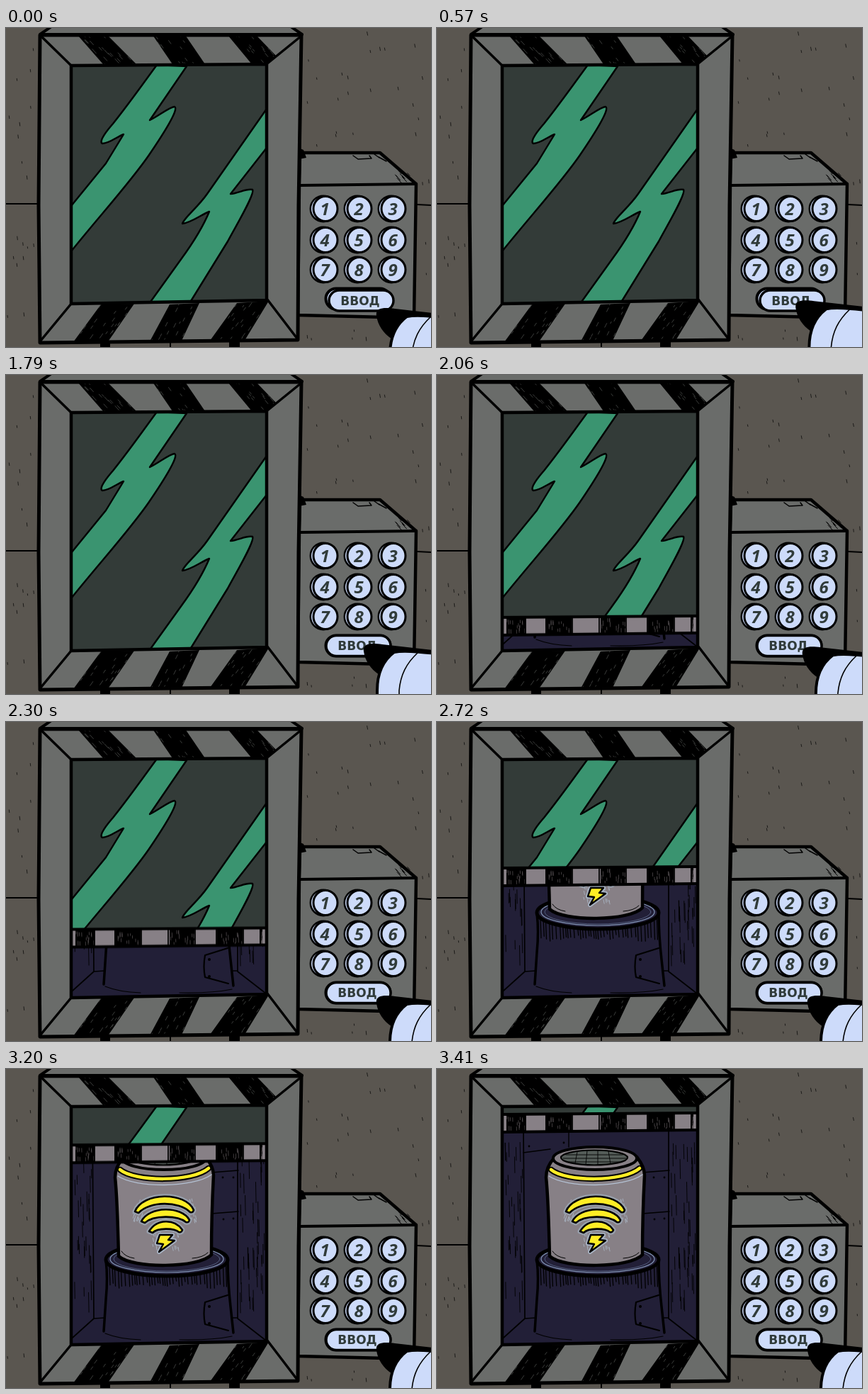
These frames come from a looping animation (600 by 450 pixels, 5640 ms). An HTML page with a canvas:

```html
<!DOCTYPE html>
<html lang="ru">
<head>
<meta charset="utf-8">
<style>
html, body { margin: 0; width: 100%; height: 100%; overflow: hidden; background: #5a5650; }
canvas { display: block; width: 100vw; height: 100vh; }
</style>
</head>
<body>
<canvas id="stage" width="600" height="450"></canvas>
<script>
const W = 600, H = 450, LOOP = 5640;
const WALL = '#5a5650', METAL = '#6a6c6a', GLASS = '#333b38', GREEN = '#3a9470',
  NAVY = '#221f37', CAN = '#878086', PALE = '#cddbfa', YELLOW = '#ffed25', INK = '#000';
const OPENING = 'M92 53L368 51L368 384L92 389Z';
const stage = document.getElementById('stage').getContext('2d');

let seed = 7;
const rnd = (a, b) => {
  seed = (seed * 16807) % 2147483647;
  return a + (b - a) * seed / 2147483647;
};

// Fill and/or stroke an SVG path.
function shape(g, d, fill, width = 0, color = INK) {
  const p = new Path2D(d);
  if (fill) { g.fillStyle = fill; g.fill(p); }
  if (width) { g.lineWidth = width; g.strokeStyle = color; g.stroke(p); }
}

function oval(g, x, y, rx, ry, fill, width = 0, color = INK) {
  g.beginPath();
  g.ellipse(x, y, rx, ry, 0, 0, 7);
  if (fill) { g.fillStyle = fill; g.fill(); }
  if (width) { g.lineWidth = width; g.strokeStyle = color; g.stroke(); }
}

function pill(g, x, y, w, h, fill, width) {
  g.beginPath();
  g.roundRect(x, y, w, h, h / 2);
  g.fillStyle = fill;
  g.fill();
  g.lineWidth = width;
  g.strokeStyle = INK;
  g.stroke();
}

// Scattered slanted strokes inside a box.
function strokes(g, n, x0, y0, x1, y1, slant, len, color, width = 1) {
  g.beginPath();
  for (let i = 0; i < n; i++) {
    const x = rnd(x0, x1), y = rnd(y0, y1), l = rnd(len * 0.4, len);
    g.moveTo(x, y);
    g.lineTo(x + slant * l, y + l);
  }
  g.lineWidth = width;
  g.strokeStyle = color;
  g.stroke();
}

function within(g, d, draw) {
  g.save();
  g.clip(new Path2D(d), 'evenodd');
  draw();
  g.restore();
}

function layer(draw) {
  const c = document.createElement('canvas');
  c.width = W;
  c.height = H;
  const g = c.getContext('2d');
  g.lineJoin = g.lineCap = 'round';
  draw(g);
  return c;
}

function stripe(g, d, x, y, slant) {
  shape(g, d, INK);
  within(g, d, () => strokes(g, 38, x, y, x + 90, y + 52, slant, 6, '#4b4d4b', 0.8));
}

function keypad(g) {
  shape(g, 'M414 222L415 179L418 176L528 176L579 220L576 409L412 405Z', METAL, 4.5);
  shape(g, 'M414 222L579 220', null, 4);
  shape(g, 'M413 169L420 172L424 183L414 185Z', INK);
  shape(g, 'M490 180L497 185L516 184L513 180M520 178L527 183M526 182L537 188', null, 1.5);
  strokes(g, 12, 545, 198, 568, 212, 0.9, 7, INK);
  g.font = 'italic bold 24px "Open Sans", sans-serif';
  g.textAlign = 'center';
  for (let i = 0; i < 9; i++) {
    const x = 450 + i % 3 * 48, y = [255, 299, 341][i / 3 | 0];
    oval(g, x - 2, y, 19.5, 19.5, INK);
    oval(g, x - 2.5, y, 16.5, 16.5, PALE);
    oval(g, x + 1, y, 17, 17.5, PALE, 3);
    g.fillStyle = '#303b3a';
    g.fillText(i + 1, x, y + 9);
  }
}

const shell = layer(g => {
  const hole = 'M0 0H600V450H0Z' + OPENING;
  within(g, hole, () => {
    g.fillStyle = WALL;
    g.fillRect(0, 0, W, H);
    strokes(g, 18, 2, 5, 42, 440, 0.12, 5, '#1c1b19');
    strokes(g, 22, 425, 5, 598, 165, 0.2, 5, '#1c1b19');
    strokes(g, 4, 585, 180, 598, 360, 0.1, 5, '#1c1b19');
    strokes(g, 5, 420, 412, 520, 440, 0.1, 5, '#1c1b19');
    shape(g, 'M0 248L46 248M580 249L600 250M232 443V450', null, 2);
    g.fillStyle = INK;
    g.fillRect(133, 443, 14, 7);
    g.fillRect(315, 442, 15, 8);
    keypad(g);
    shape(g, 'M48 9L64 -2H402L418 9Z', METAL, 4);
    shape(g, 'M48 10L417 10L413 250L412 440L48 444L46 250Z', METAL);
    stripe(g, 'M101 10L145 12L184 51L137 51Z', 100, 6, 0.9);
    stripe(g, 'M207 10L253 10L281 51L235 51Z', 207, 6, 0.7);
    stripe(g, 'M313 10L354 11L382 40L368 51L347 51Z', 312, 6, 0.8);
    stripe(g, 'M134 390L181 389L145 441L95 443Z', 95, 388, -0.7);
    stripe(g, 'M231 390L273 388L248 441L203 442Z', 203, 388, -0.5);
    stripe(g, 'M326 388L371 385L338 439L288 441Z', 288, 386, -0.7);
    shape(g, 'M48 10L417 10L413 250L412 440L48 444L46 250Z', null, 5);
    shape(g, 'M50 12L91 52M416 12L369 50M92 389L49 441M369 383L411 438', null, 3.5);
  });
  shape(g, OPENING, null, 4.5);
});

const glass = layer(g => {
  g.fillStyle = GLASS;
  g.fillRect(90, 50, 280, 345);
  shape(g, 'M213 52L255 54L203 130C217 123 230 112 238 111C245 114 221 151 202 179C176 217 133 264 92 315L92 251L141 191L166 150C157 153 146 163 136 163C130 160 144 143 151 135C172 109 194 78 213 52Z', GREEN, 2.4);
  shape(g, 'M368 114L368 169L317 234C329 233 339 226 348 228C352 233 327 275 313 301L258 390L202 389L248 325Q275 288 287 259C276 263 261 275 249 276C251 268 270 254 284 234Z', GREEN, 2.4);
});

function pedestal(g) {
  shape(g, 'M141 270L143 300L138 372Q225 394 321 374L314 300L313 270Z', NAVY);
  shape(g, 'M141 270Q144 295 141 325L138 370M313 270Q313 300 317 335L321 372', null, 3.5);
  shape(g, 'M140 373Q160 381 190 382M245 382Q290 383 319 377', null, 1.2);
  oval(g, 227, 269, 86, 23, NAVY, 5);
  oval(g, 227, 268, 80, 19, null, 1.2, '#8497b8');
  oval(g, 227, 268, 75, 17, null, 0.7, '#66769a');
  g.beginPath();
  for (let x = 146; x < 311; x += rnd(2.5, 6)) {
    const edge = (x - 227) / 88, y = 269 + 24 * Math.sqrt(1 - edge * edge);
    g.moveTo(x, y);
    g.lineTo(x + 1, y + rnd(6, 14) + 20 * edge * edge);
  }
  g.lineWidth = 1.3;
  g.strokeStyle = INK;
  g.stroke();
  shape(g, 'M313 319L281 329Q278 345 281 360L314 369', null, 2.2);
  oval(g, 287, 335, 2, 2, INK);
  oval(g, 287, 359, 2, 2, INK);
}

// Crescent with its ends at (x0,y) and (x1,y-2).
function wave(g, x0, x1, y, rise) {
  const m = (x0 + x1) / 2, w = (x1 - x0) / 4;
  const d = `M${x0} ${y}C${x0 + 11} ${y - rise} ${x1 - 11} ${y - rise} ${x1} ${y - 2}Q${x1 - 1} ${y + 2} ${x1 - 5} ${y + 1}C${m + w} ${y - rise + 13} ${m - w} ${y - rise + 13} ${x0 + 5} ${y + 2}Z`;
  shape(g, d, YELLOW, 7, '#98a0ad');
  shape(g, d, YELLOW, 2.6);
}

function can(g) {
  shape(g, 'M165 126Q154 138 154 153Q157 180 159 264C178 282 273 281 290 262Q290 205 293 150Q293 138 282 124Z', CAN, 4.5);
  oval(g, 223, 126, 59, 16, CAN, 4);
  oval(g, 222, 125, 47, 10.5, '#555d59', 2.2);
  shape(g, 'M182 121H262M178 126H267M186 131H258M198 117L195 133M212 115L210 135M227 115V135M242 116L245 134', null, 0.9);
  const band = 'M161 142C181 159 263 160 286 140';
  shape(g, 'M158 151C183 168 264 168 290 149', null, 1.3, '#b4c1d4');
  shape(g, band, null, 8.5);
  shape(g, band, null, 4.5, YELLOW);
  strokes(g, 24, 180, 184, 194, 214, -0.3, 6, '#a4adba');
  strokes(g, 24, 254, 183, 268, 213, 0.2, 6, '#a4adba');
  strokes(g, 32, 205, 230, 244, 252, 0.2, 6, '#a4adba');
  wave(g, 182, 265, 201, 28);
  wave(g, 191, 259, 215, 22);
  wave(g, 202, 249, 229, 18);
  const bolt = 'M217 234L235 234L229 241L238 242L216 258L222 247L213 246Z';
  shape(g, bolt, YELLOW, 6, '#a8b4c5');
  shape(g, bolt, YELLOW, 2.4);
  shape(g, 'M163 257Q168 265 181 267M263 267Q278 266 285 259', null, 1);
}

const room = layer(g => {
  g.fillStyle = NAVY;
  g.fillRect(90, 50, 280, 345);
  shape(g, 'M122 80L124 352L94 379M327 80L327 352L367 383M124 352L139 351M320 351H327', null, 1.7);
  shape(g, 'M122 118L160 113M186 110V85M290 146L328 143M290 204L328 201', null, 1.4);
  for (const [x, y] of [[130, 109], [179, 104], [306, 153], [321, 153], [307, 212], [321, 211]])
    oval(g, x, y, 1.4, 1.4, INK);
  strokes(g, 32, 96, 95, 121, 325, 0.02, 30, INK, 0.9);
  strokes(g, 50, 330, 95, 365, 325, 0.02, 30, INK, 0.9);
  pedestal(g);
  can(g);
});

const bar = layer(g => {
  const top = x => 1 - (x - 93) * 0.008, low = x => 26 - (x - 93) * 0.013;
  g.translate(0, 10);
  shape(g, 'M93 1L367 -1L367 23L93 26Z', CAN);
  for (const [a, b] of [[98, 125], [153, 190], [231, 266], [298, 334], [358, 362]]) {
    const d = `M${a} ${top(a)}L${b} ${top(b)}L${b} ${low(b)}L${a} ${low(a)}Z`;
    shape(g, d, INK);
    within(g, d, () => strokes(g, 16, a, 2, b, 20, 0.03, 7, '#5c575a', 0.7));
  }
  for (const x of [125, 154, 191, 229, 267, 297, 335, 359])
    shape(g, `M${x} ${top(x)}V${low(x)}`, null, 1.8);
  shape(g, 'M93 1L367 -1M93 26L367 23', null, 4);
});

const lerp = (a, b, p) => a + (b - a) * p;
const span = (t, a, b) => Math.min(1, Math.max(0, (t - a) / (b - a)));
const smooth = p => p * p * (3 - 2 * p);

// Finger offset: approach, push, withdraw.
function fingerAt(t) {
  if (t < 600) {
    const p = span(t, 0, 585);
    return [lerp(17, 0, p), lerp(11, 0, p)];
  }
  if (t < 1400) {
    const p = span(t, 600, 1200);
    return [lerp(0, -1, p), lerp(0, -5, p)];
  }
  const p = smooth(span(t, 1780, 2270));
  return [lerp(-1, 17, p), lerp(-5, 2, p)];
}

function enterKey(g, push) {
  const dx = 4 * (1 - push), dy = 2.5 * (1 - push);
  pill(g, 451.5, 367.5, 91, 29, PALE, 4);
  pill(g, 452 + dx, 367.5 + dy, 91, 29, PALE, 3.4);
  g.fillStyle = '#303b3a';
  g.font = 'bold 17px "DejaVu Sans", sans-serif';
  g.textAlign = 'center';
  g.fillText('ВВОД', 496 + dx, 388 + dy);
}

function finger(g, [x, y]) {
  g.save();
  g.translate(x, y);
  shape(g, 'M506 395C504 383 517 383 532 385L640 397V490H524L528 428C515 419 508 408 506 395Z', INK);
  shape(g, 'M525 490V450C525 425 533 408 549 396C565 393 585 396 640 401V490Z', PALE, 4);
  shape(g, 'M556 490V450C558 428 566 412 582 397', null, 1.6);
  g.restore();
}

function render(t) {
  const g = stage, y = Math.min(394, 63 + (3410 - Math.min(t, 3410)) * 0.2058);
  g.lineJoin = g.lineCap = 'round';
  within(g, OPENING, () => {
    g.drawImage(room, 0, 0);
    within(g, `M0 0H600V${y}H0Z`, () => g.drawImage(glass, 0, 0));
    g.drawImage(bar, 0, y - 10);
  });
  g.drawImage(shell, 0, 0);
  enterKey(g, span(t, 600, 1200));
  finger(g, fingerAt(t));
}

// Steps of 30 ms with a pause between 1200 and 1400.
function stepped(t) {
  if (t < 1400) return Math.min(1200, Math.floor(t / 30) * 30);
  return Math.min(3410, 1400 + Math.floor((t - 1400) / 30) * 30);
}

const start = performance.now();
function tick() {
  render(stepped((performance.now() - start) % LOOP));
  requestAnimationFrame(tick);
}
tick();
</script>
</body>
</html>
```
